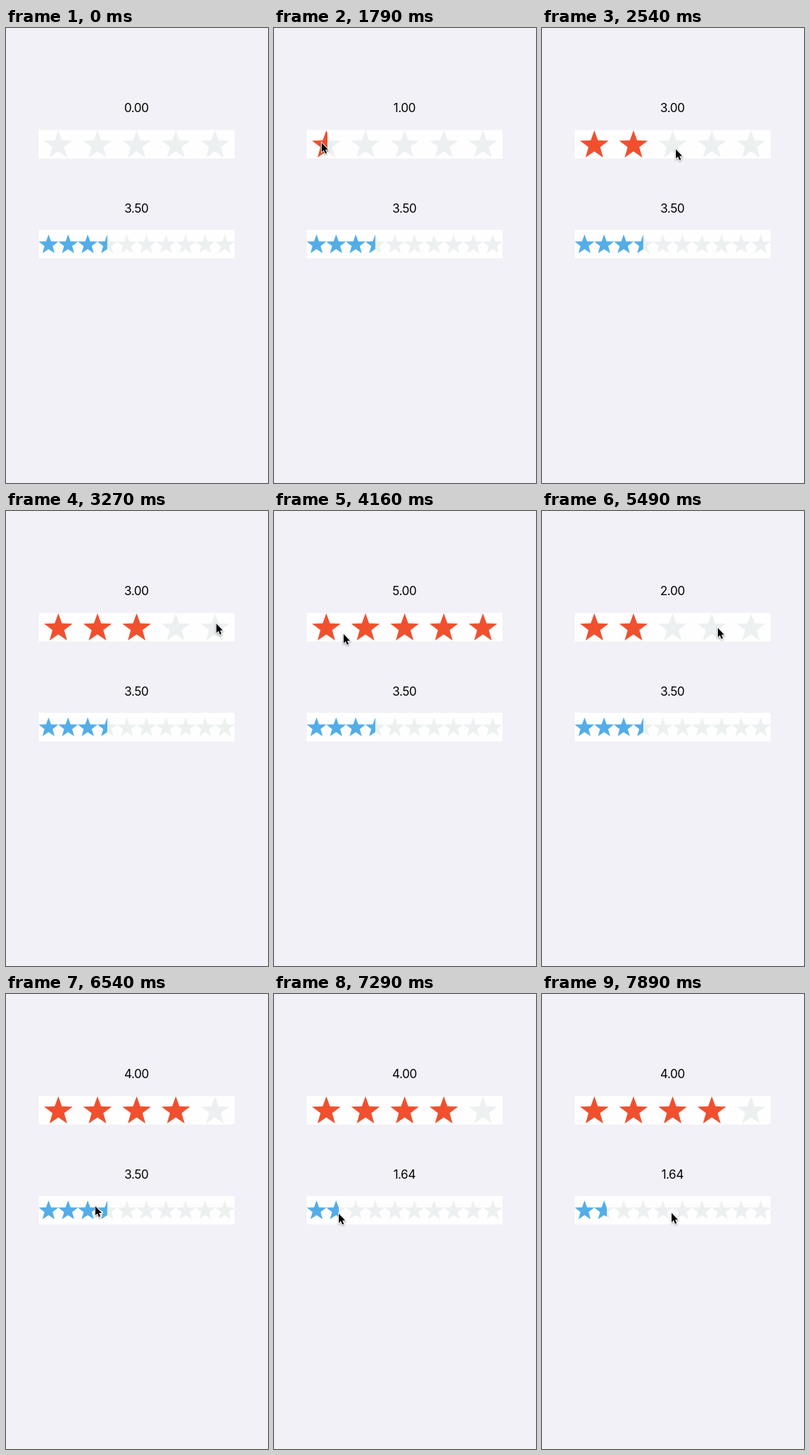
These frames come from a looping animation (368x638 px, 8000 ms). An HTML page:

```html
<!DOCTYPE html>
<html lang="en">
<head>
<meta charset="utf-8">
<title>Star rating</title>
<style>
  html, body { margin: 0; width: 100%; height: 100%; overflow: hidden; background: #f2f1f7; }
  svg { display: block; width: 368px; height: 638px; }
  text { font: 17px Inter, "Liberation Sans", sans-serif; letter-spacing: -.45px; text-anchor: middle; }
  #cursor { filter: drop-shadow(0 1px 1px rgba(0, 0, 0, .4)); }
</style>
</head>
<body>
<svg viewBox="0 0 368 638">
  <g id="rows"></g>
  <path id="cursor" d="M0 0V13L2.9 10.3L5 15.2L7.1 14.3L5.1 9.5H9Z"
        stroke="#fff" stroke-width="1.8" paint-order="stroke"/>
</svg>
<script>
const LOOP = 8000, LEFT = 46, WIDTH = 275;
const FIRST = 900, STEP = 148.4, LEAD = 15;   // screen refreshes in coarse steps
const FILL_TIME = 280;
const cursor = document.getElementById('cursor');
const rowsBox = document.getElementById('rows');

function add(parent, name, attrs) {
  const el = document.createElementNS('http://www.w3.org/2000/svg', name);
  for (const key in attrs) el.setAttribute(key, attrs[key]);
  return parent.appendChild(el);
}

function star(cx, cy, r) {
  const pts = Array.from({ length: 10 }, (_, i) => {
    const a = i * Math.PI / 5, d = i % 2 ? r * .41 : r;
    return (cx + d * Math.sin(a)).toFixed(2) + ' ' + (cy - d * Math.cos(a)).toFixed(2);
  });
  return 'M' + pts.join('L') + 'Z';
}

function makeRow(id, top, count, r, color, baseline) {
  const pitch = WIDTH / count;
  let d = '';
  for (let i = 0; i < count; i++) d += star(LEFT + pitch * (i + .5), top + 20 + r * .067, r);
  const label = add(rowsBox, 'text', { x: 183.2, y: baseline });
  add(rowsBox, 'rect', { x: LEFT, y: top, width: WIDTH, height: 40, fill: '#fefefe' });
  add(rowsBox, 'path', { d, fill: '#ecf0f1' });
  const clip = add(rowsBox, 'clipPath', { id });
  const mask = add(clip, 'rect', { x: LEFT, y: top, height: 40 });
  add(rowsBox, 'path', { d, fill: color, 'clip-path': `url(#${id})` });
  return (value, fill) => {
    label.textContent = value.toFixed(2);
    mask.setAttribute('width', fill * pitch);
  };
}

const rows = [
  { start: 0, show: makeRow('red', 143, 5, 21, '#f0502e', 118.3),
    taps: [[1645, 1], [2388, 3], [3427, 5], [4168, 1], [4910, 2], [5504, 4]] },
  { start: 3.5, show: makeRow('blue', 283, 10, 14.5, '#52ade9', 259),
    taps: [[6988, 1.64]] }
];

// Pointer moves: begin, end, target x, target y, vertical bow of the path
const origin = [231, 186];
const moves = [
  [900, 1494, 67, 161, -45],
  [1940, 2384, 188, 170, 16],
  [2533, 2830, 244.5, 166, 0],
  [2830, 3274, 295.5, 158, 0],
  [3720, 4313, 81.5, 166, 25],
  [4313, 4758, 136, 167, 0],
  [5055, 5500, 247, 164, 19],
  [5500, 5800, 245, 168, 0],
  [5960, 6984, 91, 308, 30],
  [7290, 7875, 182, 307, 3]
];

const clamp = u => Math.min(1, Math.max(0, u));
const smooth = u => u * u * (3 - 2 * u);
const mix = (a, b, p) => a + (b - a) * p;

function pointerAt(t) {
  let [x, y] = origin;
  for (const [from, to, tx, ty, bow] of moves) {
    const p = Math.sin(clamp((t - from) / (to - from)) * Math.PI / 2);
    x = mix(x, tx, p);
    y = mix(y, ty, p) + bow * 4 * p * (1 - p);
  }
  return [x, y];
}

function showRow({ start, taps, show }, t) {
  let value = start, fill = start;
  for (const [at, rating] of taps) {
    if (t < at) break;
    fill = mix(value, rating, smooth(clamp((t - at) / FILL_TIME)));
    value = rating;
  }
  show(value, fill);
}

function draw(time) {
  const t = FIRST + STEP * Math.floor((time + LEAD - FIRST) / STEP + 1e-6);
  cursor.setAttribute('visibility', t < FIRST ? 'hidden' : 'visible');
  cursor.setAttribute('transform', `translate(${pointerAt(t)})`);
  rows.forEach(row => showRow(row, t));
}

const begin = performance.now();
function tick() {
  draw((performance.now() - begin) % LOOP);
  requestAnimationFrame(tick);
}
tick();
</script>
</body>
</html>
```
